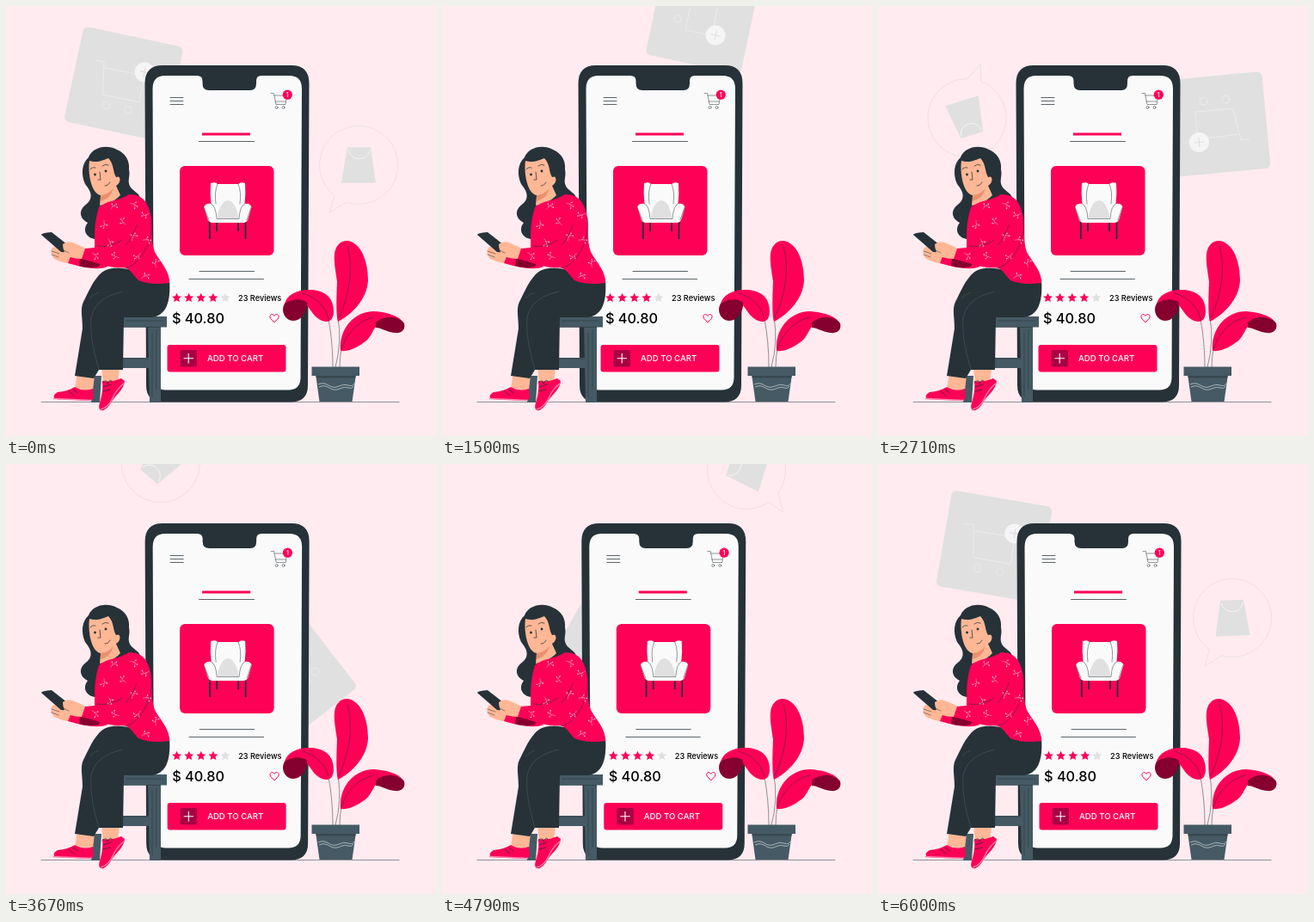
An HTML page for the animation above (6.04 s loop, 500 by 500 pixels).

```html
<!DOCTYPE html>
<html lang="en">
<head>
<meta charset="utf-8">
<title>Add to cart</title>
<style>
  html, body { margin: 0; width: 100%; height: 100%; overflow: hidden; background: #ffebf0; }
  svg { display: block; width: 100vw; height: 100vh; }
  text { font-family: Inter, "Open Sans", sans-serif; font-weight: 500; }
  .line { fill: none; stroke: #263238; stroke-width: .75; stroke-linecap: round; stroke-linejoin: round; }
  .fine { stroke-width: .5; }
  .pink { fill: #ff0057; }
  .wine { fill: #85002f; }
  .dark { fill: #263238; }
  .skin { fill: #ffb795; }
  .wood { fill: #455a64; }
  .grey { fill: #e0e0e0; }
  .pale { fill: #fafafa; }
</style>
</head>
<body>
<svg viewBox="0 0 500 500">
  <defs>
    <clipPath id="sweaterClip"><use href="#sweater"/></clipPath>
    <g id="sprig" fill="none" stroke="#ffc4d7" stroke-width=".55" stroke-linecap="round">
      <path d="M-4 4C-2 1 0-1 4-3M-1 1L-2-3M1-1L5 1"/>
      <path d="M4-3h.1M-2-3.5h.1M5 1.5h.1" stroke-width="1.700"/>
    </g>
  </defs>
  <rect width="500" height="500" fill="#ffebf0"/>

  <g id="orbit">
    <rect class="grey" x="77.500" y="34.500" width="118.500" height="113" rx="6" transform="rotate(12 136.5 91)"/>
    <g fill="none" stroke="#ececec" stroke-width=".9">
      <path d="M104 63L114 65L112 103L155 112L160 87M114 72L151 79"/>
      <circle cx="116.500" cy="115.500" r="4.300"/>
      <circle cx="142" cy="121" r="4.300"/>
    </g>
    <circle cx="161" cy="77" r="11.500" fill="#f5f5f5"/>
    <path d="M155.500 75.800L166.500 78.200M162.200 71.500L159.800 82.500" stroke="#e0e0e0" stroke-width="1.200"/>
    <path d="M382 220.500A45.500 45.500 0 1 1 396 228L376 240Z" fill="none" stroke="#e5dcdf" stroke-width=".7"/>
    <path class="grey" d="M397 164H424L430 205.500H390Z"/>
    <path d="M398 167C401 181 421 181 423 167" fill="none" stroke="#f7f7f7" stroke-width=".9"/>
  </g>

  <path class="line fine" d="M41 460.500H457"/>

  <g id="phone">
    <path class="dark" d="M182 69H332Q352.500 69 352.500 90L351 441Q351 460.500 331 460.500H183Q163 460.500 163 441L161.500 90Q161.500 69 182 69Z"/>
    <path class="pale" d="M185 81H222Q228.500 81 228.500 87V90Q228.500 98 236 98H284Q291 98 291 90V87Q291 81 297 81H329Q344 81 344 96L342.500 432Q342.500 446.500 328 446.500H186Q172 446.500 172 432L170.500 96Q170.500 81 185 81Z"/>
    <path class="line" d="M191 106.500H206M191 110.500H206M191 114.500H206"/>
    <path class="line fine" d="M308 101.500H311.500L314 114.500H325L326.500 105M312 104H324M313 111H325"/>
    <circle class="line fine" cx="314.500" cy="118" r="1.500"/>
    <circle class="line fine" cx="322.500" cy="118" r="1.500"/>
    <circle class="pink" cx="327.300" cy="103.200" r="5.600"/>
    <text x="327.300" y="105.800" font-size="7" text-anchor="middle" fill="#fff">1</text>
    <path d="M228 149H284" stroke="#ff0057" stroke-width="3"/>
    <path class="line" d="M224.500 157.500H288.500M225 308.500H288.500M213 317.500H299.500"/>
    <rect class="pink" x="202" y="186" width="109.500" height="104" rx="6"/>

    <g id="chair">
      <path d="M236.800 250V271M245 250V262M270 250V262M278.500 250V271" stroke="#263238" stroke-width="1.800"/>
      <path class="pale" d="M238 206Q244 204 246 207H270Q273 204 278 206Q279 218 277.500 230Q284 229 285.500 234L281 249Q279 252.500 275 252H241Q237 252.500 235 249L230 234Q232 229 238.500 230Q237 218 238 206Z"/>
      <path class="grey" d="M246 247C246 237 252 226 258 226S270 237 270 247Z"/>
      <path class="line fine" d="M246 207Q242 216 244 230M270 207Q274 216 272 230M238.500 230Q244 232 245 247.500H271Q272 232 277.500 230M230 234L236 249M285 234L280 249"/>
    </g>

    <g id="stars"></g>
    <text x="270" y="343" font-size="9.200">23 Reviews</text>
    <text x="193" y="369" font-size="16.300">$ 40.80</text>
    <path d="M312 368L307.800 363.500C305 360 309.500 356 312 360.500C314.500 356 319 360 316.200 363.500Z" fill="none" stroke="#ff0057"/>
    <rect class="pink" x="187.500" y="394" width="138" height="31.500" rx="3"/>
    <rect x="202.500" y="400" width="19.500" height="19.500" rx="2" fill="#a90043"/>
    <path d="M206.500 409.800H218M212.200 404V415.500" stroke="#fff" stroke-width="1.100"/>
    <text x="234" y="413.300" font-size="9.600" fill="#fff">ADD TO CART</text>
  </g>

  <g id="stool">
    <path class="wood" d="M100 430H111L109 461H99ZM165 372H180V461H167ZM134 409H167V421H134Z"/>
    <path class="wood" d="M130 361H187V373.500H130Z"/>
    <path d="M134 410H166M134 373.500H180" stroke="#263238" opacity=".5"/>
    <path class="line fine" d="M170 380V455M175 377V445M140 366H182"/>
  </g>

  <g id="woman">
    <path class="skin" d="M83 426L103 429L101 447L80 445ZM111 419L132 421L130 438L113 439Z"/>
    <path class="pink" d="M80 443Q90 449 101 445L102 456L99 459L57 457Q53 453 60 449Q72 448 80 443Z"/>
    <path d="M55 456.500L100 458.500" stroke="#ff7fab" stroke-width="1.500"/>
    <path class="pink" d="M112 436Q122 438 134 433L138 436C137 447 127 452 121 463C116 470 111 472 109 469C106 463 114 455 112 436Z"/>
    <path d="M110 469Q119 467 124 456T137 439" fill="none" stroke="#ff7fab" stroke-width="1.500"/>
    <path class="line" d="M112 438Q117 433 118 439Q122 432 123 437M113 443L122 440M113 448L121 446M73 448L79 453M78 446L83 450"/>
    <path class="dark" d="M152 308C130 303 117 303 108 313C99 323 94 337 90 344C86 352 89 362 89 375L80 430L102 433L108 423H136L137 362H168C186 361 192 345 190 318Z"/>
    <path fill="none" stroke="#506068" stroke-width=".5" d="M136 332C120 336 104 342 99 362C97 385 104 408 108 423M97 340Q103 334 108 333"/>

    <path class="dark" d="M96 176C100 165 116 160 129 167C139 171 144 180 143 190C145 199 140 203 145 211C148 215 155 218 156 223L112 234L104 271C94 270 88 261 95 252C84 246 85 236 94 230C103 222 97 213 92 207C87 196 88 183 96 176Z"/>
    <path class="skin" d="M97 180C105 183 114 179 119 177C126 184 124 193 128 199C134 196 134 206 128 209L133 220C126 228 116 231 109 232L110 220C99 218 95 194 97 180Z"/>
    <path fill="#eb906e" d="M110 220Q119 219 125 212Q121 225 110 227Z"/>
    <path class="line" d="M98 190Q100 187 104 188M112 186Q115 183 119 185M109 193L110 202L107 202M115 209Q119 209 121 205"/>
    <circle class="dark" cx="103.500" cy="196" r="1.400"/>
    <circle class="dark" cx="116" cy="192" r="1.400"/>

    <path class="skin" d="M54 281Q58 278 66 280L78 289L77 300L66 298L56 294Q50 287 54 281Z"/>
    <path class="pink" d="M76 289L112 294L118 303Q105 309 72 299Z"/>
    <path class="wine" d="M86 294L112 295L108 303Q96 306 85 302Z"/>
    <path class="dark" d="M41 266Q41 264 53 263L76 281Q74 287 64 286Z"/>
    <path class="skin" d="M66 277Q72 272 80 276L93 282L89 294Q79 294 72 291Q66 286 66 277Z"/>
    <path class="line fine" d="M67 284L73 287M53 285L62 288M53 289L61 292"/>
    <path id="sweater" class="pink" d="M108 234C116 226 132 227 143 219C160 219 166 230 169 246C171 259 168 272 173 286C179 297 191 309 190 322Q168 325 154 319C148 313 146 307 138 304C122 306 105 298 88 294L92 282L103 281C104 270 101 258 108 234Z"/>
    <g id="print" clip-path="url(#sweaterClip)"></g>
    <path class="line fine" d="M169 246C171 263 166 282 154 295C148 302 139 307 130 305M106 279Q120 282 135 272M152 255Q147 270 139 278"/>
  </g>

  <g id="plant">
    <path class="line fine" d="M375 364Q380 390 380 420M386 362Q391 390 383 420M390 399Q388 408 388 420"/>
    <path class="pink" d="M387 277C378 285 383 305 385 320C384 345 384 358 386 367C402 359 420 341 421 319C421 295 412 275 397 273Q390 273 387 277Z"/>
    <path class="pink" d="M324 346C327 335 340 329 355 330C372 331 381 340 381 355C381 362 378 367 373 367C360 366 356 355 349 347Z"/>
    <path class="wine" d="M324 346C333 340 345 340 350 345C351 355 343 366 334 366C324 366 319 354 324 346Z"/>
    <path class="pink" d="M389 401C387 375 405 355 428 355C443 356 457 360 462 368L431 372C425 378 425 386 415 392C407 398 397 402 389 401Z"/>
    <path class="wine" d="M430 368C440 359 456 360 463 369C465 377 459 381 452 380C443 379 436 374 430 374Z"/>
    <path class="line fine" d="M397 280C405 305 398 340 387 362M345 334C362 339 372 350 375 364M390 399C395 382 409 366 428 362"/>
    <path class="wood" d="M360 428H407L402.500 460H364.500Z"/>
    <path d="M360 430H407L406.500 432.500H361Z" class="dark" opacity=".45"/>
    <rect class="wood" x="355.500" y="419.500" width="55.500" height="10.500"/>
    <path d="M363 440Q369 437 375 441T387 442T398 441T405 439M364 443Q370 440 376 444T388 445T398 444T404 442" fill="none" stroke="#cfd8dc" stroke-width=".7"/>
  </g>
</svg>
<script>
const LOOP = 6040;
const TURN = [[0, 0], [5290, 317.3], [LOOP, 360]];
const SWAY = [[0, 0], [1500, -3], [2710, -1], [4400, 1], [LOOP, 0]];
const byId = id => document.getElementById(id);

function starPath(cx, cy, r) {
  const points = Array.from({ length: 10 }, (_, i) => {
    const angle = i * Math.PI / 5 - Math.PI / 2;
    const reach = i % 2 ? r * 0.48 : r;
    return `${cx + reach * Math.cos(angle)} ${cy + reach * Math.sin(angle)}`;
  });
  return `M${points.join("L")}Z`;
}

byId("stars").innerHTML = Array.from({ length: 5 }, (_, i) =>
  `<path class="${i < 4 ? "pink" : "grey"}" d="${starPath(198.5 + 14.1 * i, 339.5, 5.7)}"/>`).join("");

const sprigs = [[125, 233], [149, 231], [114, 254], [162, 243], [136, 251], [148, 268],
  [164, 272], [121, 275], [153, 291], [127, 291], [174, 299], [162, 314], [104, 290]];
byId("print").innerHTML = sprigs.map(([x, y], i) =>
  `<use href="#sprig" transform="translate(${x} ${y}) rotate(${i * 67}) scale(.85)"/>`).join("");

function sample(keys, t) {
  const next = keys.findIndex(([time]) => time > t);
  const [t0, v0] = keys[next - 1];
  const [t1, v1] = keys[next];
  return v0 + (v1 - v0) * (t - t0) / (t1 - t0);
}

const orbit = byId("orbit");
const phone = byId("phone");

function draw(now) {
  const t = now % LOOP;
  orbit.setAttribute("transform", `rotate(${sample(TURN, t)} 261 134)`);
  phone.setAttribute("transform", `translate(${sample(SWAY, t)} 0)`);
}

const start = performance.now();
function tick() {
  draw(performance.now() - start);
  requestAnimationFrame(tick);
}
tick();
</script>
</body>
</html>
```
